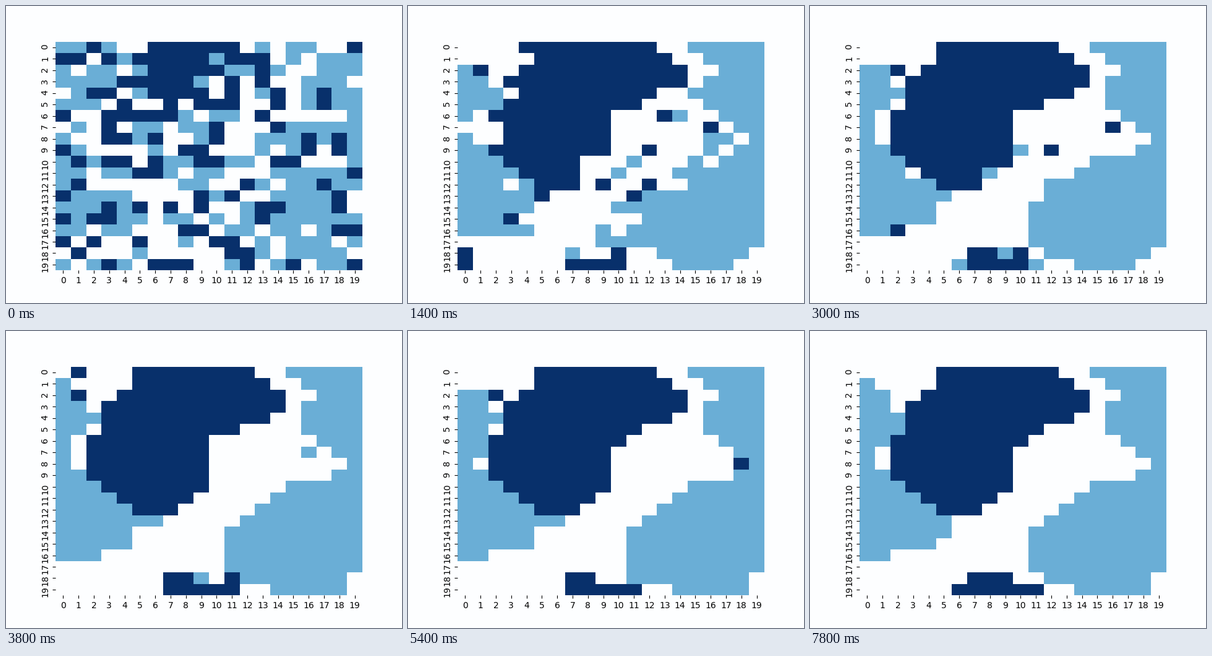
Recreate the animation shown at these times as a matplotlib script. Size 640x480 px, loop 10 s.

```python
import numpy as np
import matplotlib.pyplot as plt
from matplotlib.animation import FuncAnimation
from matplotlib.colors import ListedColormap

SIZE = 20
BARE, LIGHT, DARK = 0, 1, 2
PAPER = "#fdfeff"
STEP_MS, FRAMES = 200, 50
LAST_MOVE = 39


def edge(row, rows, cols):
    """Column where a region begins or ends in a row, from key points."""
    return int(np.rint(np.interp(row, rows, cols)))


def settled_map():
    g = np.zeros((SIZE, SIZE), int)
    for r in range(SIZE):
        west = edge(r, [0, 4.5, 7.5, 13.5, 15, 17], [0, 3.4, 0.6, 6.4, 4.6, 0])
        east = edge(r, [0, 2, 3, 5, 8, 9, 10, 14, 17, 19],
                    [15, 17, 16, 16, 19, 18, 15, 11, 11, 13.8])
        g[r, :west] = LIGHT
        g[r, east:SIZE - (r > 17)] = LIGHT
        if r < 13:
            start = edge(r, [0, 3, 9, 12], [5.4, 3.2, 1.6, 5])
            stop = edge(r, [0, 2.5, 7, 10, 12], [13, 15.4, 10, 10, 8])
            g[r, start:stop] = DARK
    g[18, 7:10] = g[19, 6:12] = DARK
    return g


def unlike_share(g):
    """Share of the eight neighbours that differ from each cell."""
    p = np.pad(g, 1, mode="edge")
    differ = sum(p[i:i + SIZE, j:j + SIZE] != g
                 for i in range(3) for j in range(3))
    return differ / 8


def loose_count(n):
    """Cells not yet settled: a fast sorting phase, then a slow tail."""
    share = 0.65 * np.exp(-n / 4.5) + 0.09 * (1 - n / LAST_MOVE)
    return int(np.ceil(share * SIZE ** 2))


def history():
    """Unwind the settled map by shuffling more and more loose cells."""
    rng = np.random.default_rng(8)
    g = settled_map()
    unrest = np.maximum(unlike_share(g), 0.3 * (g == BARE))
    unrest = unrest + 0.8 * rng.random(g.shape)
    order = np.argsort(-unrest, axis=None)
    maps = [g.copy()]
    known = 0
    for n in reversed(range(LAST_MOVE)):
        loose = order[:loose_count(n)]
        fresh = np.arange(len(loose)) >= known
        moving = loose[fresh | (rng.random(len(loose)) < 0.6)]
        g.flat[moving] = rng.permutation(g.flat[moving])
        known = len(loose)
        maps.append(g.copy())
    return maps[::-1]


maps = history()

fig, ax = plt.subplots(figsize=(6.4, 4.8), dpi=100, facecolor=PAPER)
ax.set_facecolor(PAPER)
cells = ax.pcolormesh(maps[0], vmin=BARE, vmax=DARK,
                      linewidth=0, edgecolors="white",
                      cmap=ListedColormap([PAPER, "#6aaed6", "#08306b"]))
ax.set(xlim=(0, SIZE), ylim=(0, SIZE))
ax.invert_yaxis()
ax.spines[:].set_visible(False)
mids = np.arange(SIZE) + 0.5
ax.set_xticks(mids, range(SIZE))
ax.set_yticks(mids, range(SIZE), rotation="vertical")


def draw(n):
    cells.set_array(maps[min(n, LAST_MOVE)])
    return [cells]


anim = FuncAnimation(fig, draw, frames=FRAMES, interval=STEP_MS, repeat=True)
plt.show()
```
